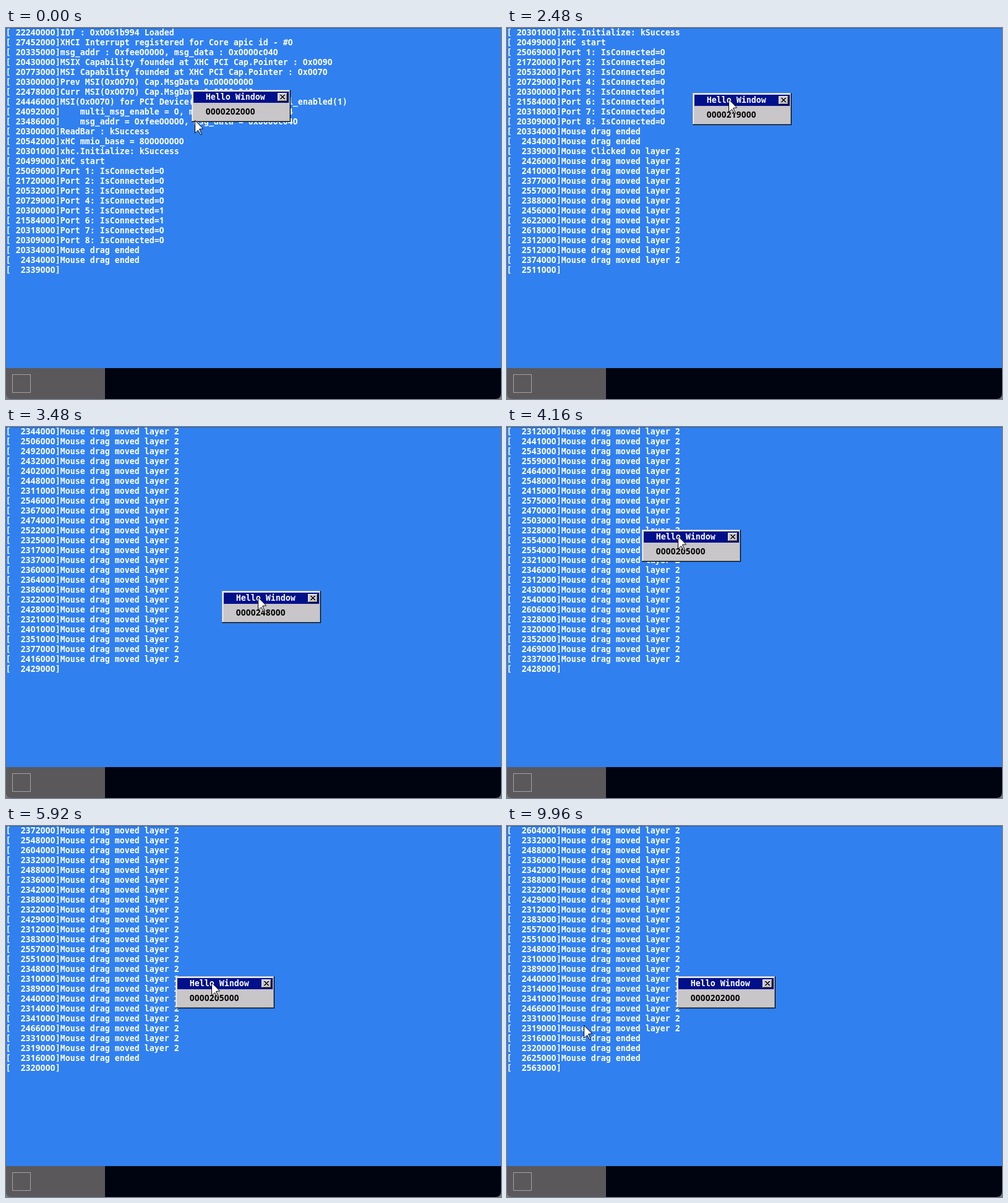
An HTML page with a canvas for the animation above (10 s loop, 800x600 px).

```html
<!DOCTYPE html>
<html lang="en">
<head>
<meta charset="utf-8">
<title>Hello Window</title>
<style>
  html, body { margin: 0; width: 100%; height: 100%; overflow: hidden; background: #3080f0; }
  canvas { display: block; width: 800px; height: 600px; }
</style>
</head>
<body>
<canvas id="stage" width="800" height="600"></canvas>
<script>
const LOOP = 10000, STEP = 40, ROWS = 25;
const CLICK = 2000, DRAG_START = 2260, DRAG_END = 5640, MOVE_EVERY = 20;
const RELEASES = [5720, 8040, 9520];

const g = document.getElementById('stage').getContext('2d');
const LETTERS = 'bold 13.2px "DejaVu Sans Mono", monospace';
const DIGITS = 'bold 13.4px "Noto Sans", "Open Sans", sans-serif';

const clamp = (v, lo, hi) => Math.min(Math.max(v, lo), hi);
const random = seed => {
  const v = Math.sin(seed * 12.9898 + 4.137) * 43758.5453;
  return v - Math.floor(v);
};

const boot = [
  'IDT : 0x0061b994 Loaded',
  'XHCI Interrupt registered for Core apic id - #0',
  'msg_addr : 0xfee00000, msg_data : 0x0000c040',
  'MSIX Capability founded at XHC PCI Cap.Pointer : 0x0090',
  'MSI Capability founded at XHC PCI Cap.Pointer : 0x0070',
  'Prev MSI(0x0070) Cap.MsgData 0x00000000',
  'Curr MSI(0x0070) Cap.MsgData 0x0000c040',
  'MSI(0x0070) for PCI Device(0, 4, 0) founded msi_enabled(1)',
  '    multi_msg_enable = 0, multi_msg_capable = 4',
  '    msg_addr = 0xfee00000, msg_data = 0x0000c040',
  'ReadBar : kSuccess',
  'xHC mmio_base = 800000000',
  'xhc.Initialize: kSuccess',
  'xHC start',
  ...Array.from({ length: 8 }, (_, i) => `Port ${i + 1}: IsConnected=${i === 4 || i === 5 ? 1 : 0}`),
  'Mouse drag ended',
  'Mouse drag ended',
  'Mouse Clicked on layer 2'
];
const SLOW_LINES = 23, FIRST_PENDING = 24;

const moves = t => Math.floor((clamp(t, DRAG_START, DRAG_END) - DRAG_START) / MOVE_EVERY);
const lastMove = FIRST_PENDING + moves(LOOP);

// Index of the log line still being written
const lastLine = t =>
  FIRST_PENDING + (t >= CLICK) + moves(t) + RELEASES.filter(r => t >= r).length;

const message = i => boot[i] || (i <= lastMove ? 'Mouse drag moved layer 2' : 'Mouse drag ended');

function stamp(i) {
  const r = random(i + 1);
  const ms = i < SLOW_LINES ? 20300 + r ** 4 * 7500 : 2310 + r ** 2 * 320;
  return `[${(Math.floor(ms) + '000').padStart(9)}]`;
}

// [time, x, y] of the pointer tip
const pointer = [
  [0, 305, 149], [320, 305, 149], [680, 445, 128], [1320, 358, 110], [2120, 358, 110],
  [2480, 358, 115], [3160, 424, 225], [3480, 407, 275], [4160, 276, 176], [4480, 469, 230],
  [5000, 318, 401], [5640, 332, 253], [6680, 332, 253], [6960, 276, 280], [7560, 479, 291],
  [8240, 479, 291], [9320, 124, 322], [LOOP, 124, 322]
];

// Slope at a key; flat at turning points and rests
function slope(i, axis) {
  const a = pointer[i - 1], b = pointer[i], c = pointer[i + 1];
  if (!a || !c || (b[axis] - a[axis]) * (c[axis] - b[axis]) <= 0) return 0;
  return (c[axis] - a[axis]) / (c[0] - a[0]);
}

function pointerAt(t) {
  const i = pointer.findIndex((p, k) => t < pointer[k + 1][0]);
  const a = pointer[i], b = pointer[i + 1];
  const d = b[0] - a[0], u = (t - a[0]) / d, v = 1 - u;
  return [1, 2].map(k => Math.round(
    a[k] * v * v * (1 + 2 * u) + b[k] * u * u * (3 - 2 * u) +
    d * u * v * (v * slope(i, k) - u * slope(i + 1, k))
  ));
}

function counter(t) {
  const r = random(t / STEP + 500);
  const load = t > CLICK && t < DRAG_END ? random(t / STEP + 900) ** 4 * 80 : 0;
  return Math.floor(188 + r * 24 + load);
}

function rect(color, x, y, w, h) {
  g.fillStyle = color;
  g.fillRect(x, y, w, h);
}

// Digits use a second face because the mono zero is dotted
function text(s, x, y, color) {
  g.fillStyle = color;
  g.textAlign = 'center';
  for (const [font, pattern] of [[LETTERS, /[^\d ]/], [DIGITS, /\d/]]) {
    g.font = font;
    [...s].forEach((c, i) => {
      if (pattern.test(c)) g.fillText(c, x + i * 8 + 3.6, y + 12);
    });
  }
}

function drawDesktop() {
  rect('#3080f0', 0, 0, 800, 550);
  rect('#2b63ac', 0, 0, 800, 1);
  rect('#000411', 0, 550, 800, 50);
  rect('#5a585a', 0, 550, 160, 50);
  g.strokeStyle = '#a4a2a4';
  g.lineWidth = 1;
  g.strokeRect(10.5, 560.5, 29, 29);
}

function drawCorners() {
  g.fillStyle = '#7c7c80';
  for (const [x, s] of [[0, 1], [800, -1]]) {
    g.beginPath();
    g.moveTo(x, 591);
    g.quadraticCurveTo(x, 600, x + 9 * s, 600);
    g.lineTo(x, 600);
    g.fill();
  }
}

function drawLog(last) {
  for (let row = 0; row < ROWS; row++) {
    const i = last - ROWS + 1 + row;
    text(stamp(i) + (i < last ? message(i) : ''), 0, row * 16, '#fff');
  }
}

function drawClose() {
  rect('#000', 0, 0, 16, 14);
  rect('#fff', 0, 0, 15, 13);
  rect('#848484', 1, 1, 14, 12);
  rect('#c8c6c8', 1, 1, 13, 11);
  for (let i = 0; i < 7; i++) {
    rect('#000', 4 + i, 3 + i, 2, 1);
    rect('#000', 10 - i, 3 + i, 2, 1);
  }
}

function drawWindow(x, y, value) {
  const w = 160, h = 52;
  g.save();
  g.translate(x, y);
  rect('#000', 0, 0, w, h);
  rect('#c8c6c8', 0, 0, w - 1, h - 1);
  rect('#848484', 1, 1, w - 2, h - 2);
  rect('#fff', 1, 1, w - 3, h - 3);
  rect('#c8c6c8', 2, 2, w - 4, h - 4);
  rect('#00108b', 3, 3, w - 6, 18);
  text('Hello Window', 23, 4, '#fff');
  text(`${value}000`.padStart(10, '0'), 23, 28, '#000');
  g.translate(w - 21, 5);
  drawClose();
  g.restore();
}

const arrow = new Path2D('M.5 .5L13.5 13.8L7.5 14.5L11.5 23L9.5 23.5L5.5 16.5L.5 21Z');
function drawPointer(x, y) {
  g.save();
  g.translate(x, y);
  g.fillStyle = '#fff';
  g.strokeStyle = '#000';
  g.lineWidth = 1;
  g.fill(arrow);
  g.stroke(arrow);
  g.restore();
}

function draw(t) {
  const [x, y] = pointerAt(t);
  const [dx, dy] = pointerAt(clamp(t, CLICK, DRAG_END));
  drawDesktop();
  drawLog(lastLine(t));
  drawWindow(dx - 58, dy - 10, counter(t));
  drawPointer(x, y);
  drawCorners();
}

let start, shown = -1;
function tick(now) {
  start ??= now;
  const t = Math.floor(((now - start) % LOOP) / STEP) * STEP;
  if (t !== shown) draw(shown = t);
  requestAnimationFrame(tick);
}
draw(0);
requestAnimationFrame(tick);
</script>
</body>
</html>
```
